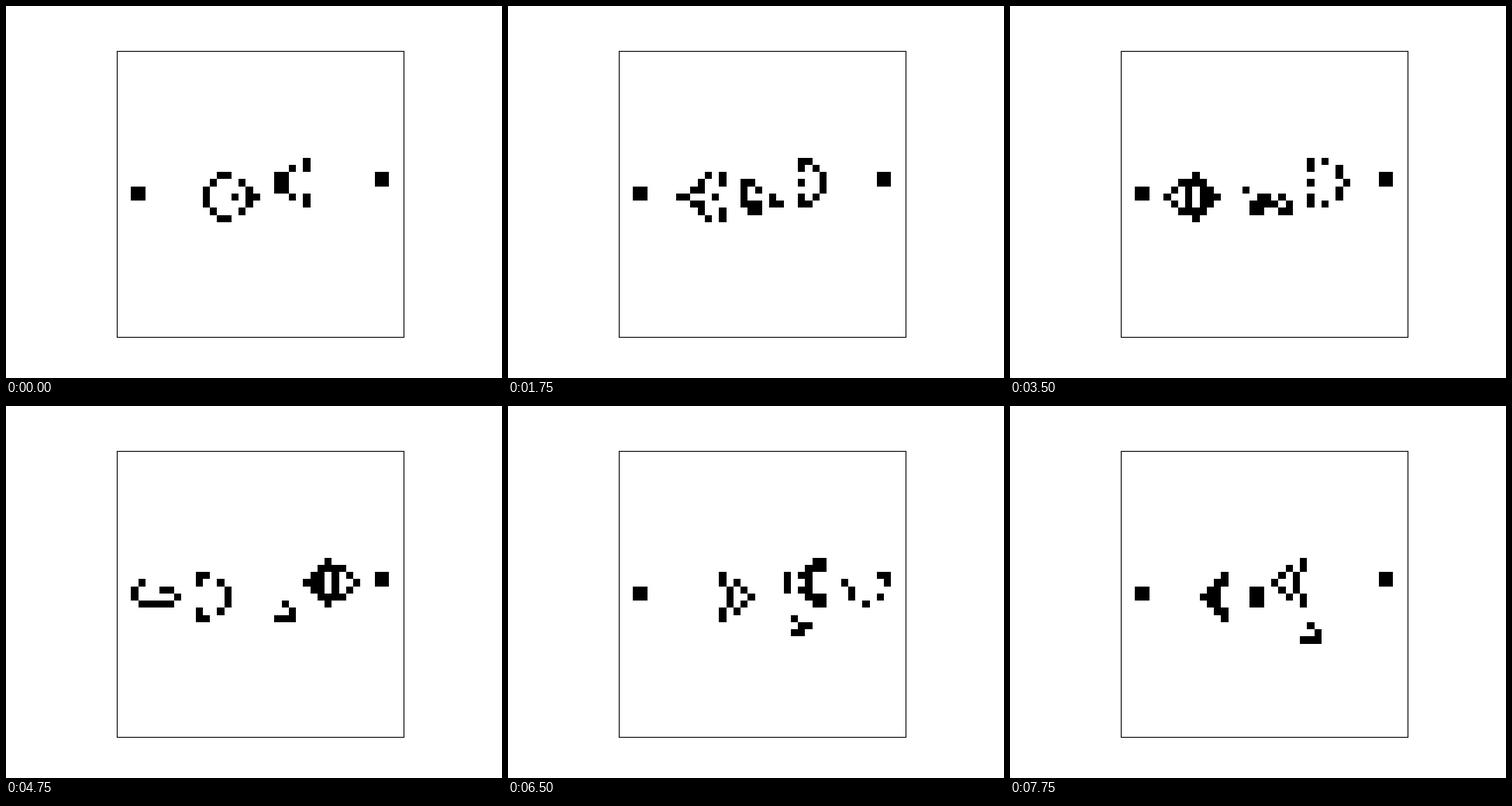
Animation of 640 by 480 pixels, one loop 8000 ms. Source, as a matplotlib script:

```python
import numpy as np
import matplotlib.pyplot as plt
from matplotlib.animation import FuncAnimation

SIZE = 40
GENERATIONS = 32
GUN = [
    "........................O...........",
    "......................O.O...........",
    "............OO......OO............OO",
    "...........O...O....OO............OO",
    "OO........O.....O...OO..............",
    "OO........O...O.OO....O.O...........",
    "..........O.....O.......O...........",
    "...........O...O....................",
    "............OO......................",
]


def seed(top=15, left=2):
    grid = np.zeros((SIZE, SIZE), dtype=int)
    for r, line in enumerate(GUN):
        for c, mark in enumerate(line):
            grid[top + r, left + c] = mark == "O"
    return grid


def step(grid):
    """Advance Conway's Game of Life by one generation."""
    near = sum(
        np.roll(grid, (dy, dx), axis=(0, 1))
        for dy in (-1, 0, 1)
        for dx in (-1, 0, 1)
        if dy or dx
    )
    return ((near == 3) | ((grid == 1) & (near == 2))).astype(int)


history = [seed()]
while len(history) < GENERATIONS:
    history.append(step(history[-1]))

fig, ax = plt.subplots(figsize=(6.4, 4.8), dpi=100)
ax.set_xticks([])
ax.set_yticks([])
image = ax.imshow(history[0], cmap="binary", vmin=0, vmax=1, interpolation="nearest")


def update(i):
    image.set_data(history[i])
    return (image,)


anim = FuncAnimation(fig, update, frames=GENERATIONS, interval=250,
                     repeat=True, repeat_delay=0)
plt.show()
```
